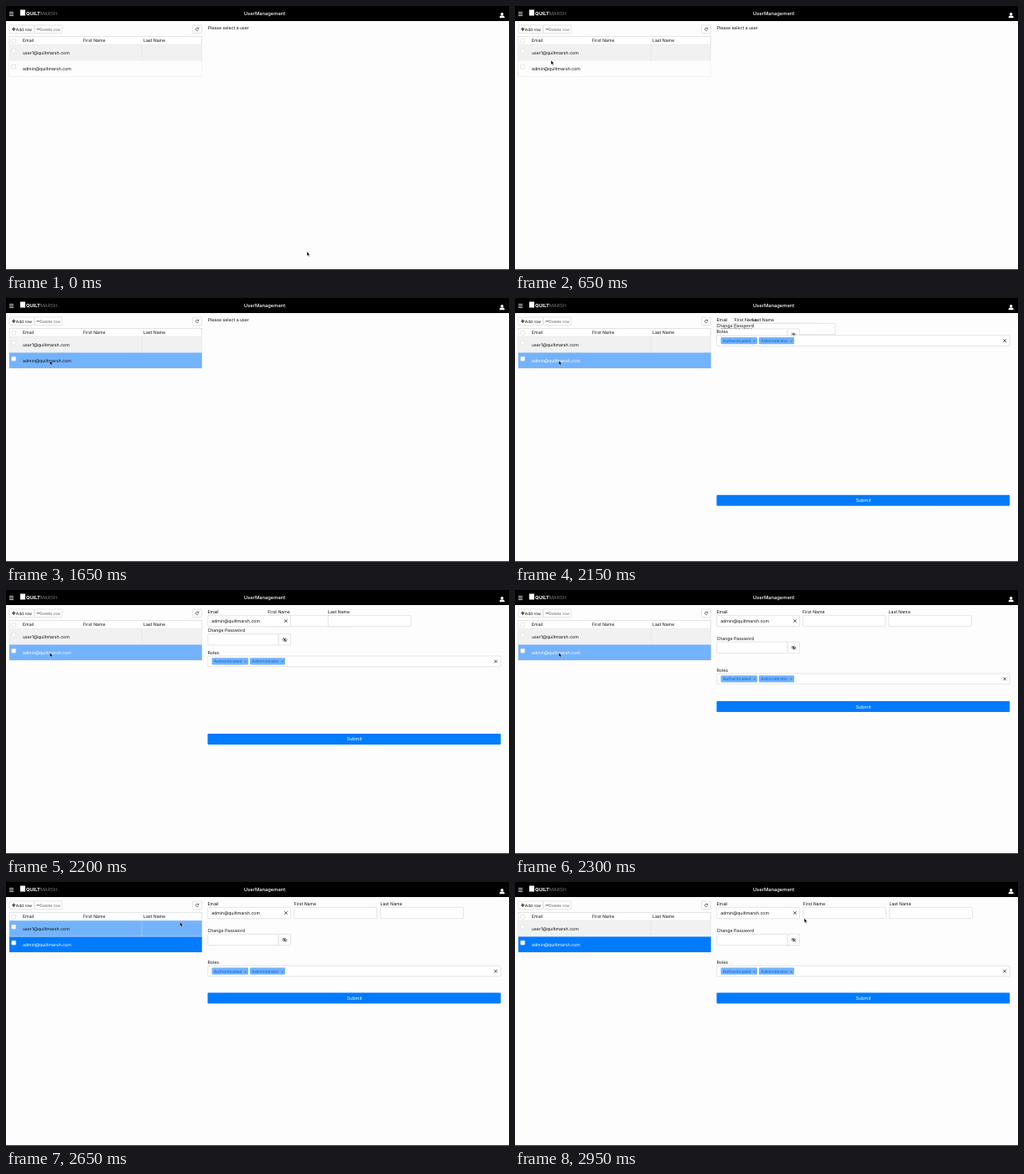
These frames come from a looping animation (600x316 px, 3000 ms). An HTML page:

```html
<!DOCTYPE html>
<html lang="en">
<head>
<meta charset="utf-8">
<title>UserManagement</title>
<style>
  html, body { margin: 0; width: 100%; height: 100%; overflow: hidden; background: #fdfdfd; }
  svg { display: block; width: 100vw; height: 100vh; }
  text { font: 5.2px Inter, sans-serif; fill: #111; text-rendering: geometricPrecision; }
  .small { font-size: 4.85px; }
  .muted { fill: #666; }
  .white { fill: #fff; }
  .tag text { font-size: 5.1px; fill: #0d62d0; }
  .tag rect { fill: #73b3fd; }
  .box { fill: #fff; stroke: #d4d4d4; stroke-width: .6; }
  .line { fill: none; stroke: #222; stroke-width: .8; }
</style>
</head>
<body>
<svg viewBox="0 0 600 316">
  <rect width="600" height="316" fill="#fdfdfd"/>
  <rect y="315" width="600" height="1" fill="#333"/>

  <rect width="600" height="18" fill="#000"/>
  <path class="line" d="M4 7.5h5M4 9.5h5M4 11.5h5" style="stroke:#fff"/>
  <rect class="white" x="17" y="4.5" width="6" height="7"/>
  <text x="24" y="10.5" class="white" style="font-size:5.7px;font-weight:700">QUILT<tspan fill="#999" font-weight="300">MARSH</tspan></text>
  <text x="308.5" y="11" class="white" text-anchor="middle" style="font-size:5.8px;font-weight:500">UserManagement</text>
  <g class="white"><circle cx="591.7" cy="9.7" r="1.7"/><path d="M588.8 14.2v-1q0-1.7 1.8-1.7h2.2q1.8 0 1.8 1.7v1z"/></g>

  <g id="table">
    <rect class="box" x="4" y="23" width="29.5" height="9.5" rx="1"/>
    <path class="line" d="M7 27.8h4.4M9.2 25.6v4.4" style="stroke-width:1.1"/>
    <text class="small" x="11.8" y="29.5">Add row</text>
    <rect class="box" x="34" y="23" width="33" height="9.5" rx="1"/>
    <path class="line" d="M36.5 27.8h4" style="stroke:#666;stroke-width:1.1"/>
    <text class="small muted" x="40.4" y="29.5">Delete row</text>
    <rect class="box" x="222.5" y="23" width="11" height="9.5" rx="1"/>
    <path class="line" d="M229.5 26.8a1.7 1.7 0 1 0 .2 1.8M229.8 25.8v1.5h-1.5" style="stroke-width:.6"/>
    <rect class="box" x="4" y="36.5" width="229.7" height="47.5"/>
    <text x="20" y="43.2">Email</text>
    <text x="92" y="43.2">First Name</text>
    <text x="164" y="43.2">Last Name</text>
    <rect id="row1" x="4" y="46" width="229.7" height="19"/>
    <rect id="row2" x="4" y="65.3" width="229.7" height="18.7"/>
    <path d="M4 46.2h229.7M4 65.2h229.7M162 46.2v19" fill="none" stroke="#ddd" stroke-width=".4"/>
    <text x="20" y="57.8">user1@quiltmarsh.com</text>
    <text id="row2Text" x="20" y="76.6">admin@quiltmarsh.com</text>
    <rect class="box" x="6.7" y="39.2" width="5" height="5" rx="1"/>
    <rect class="box" x="6.7" y="51.2" width="5" height="5" rx="1"/>
    <rect class="box" x="6.7" y="70.2" width="5" height="5" rx="1"/>
  </g>

  <text id="prompt" x="240.7" y="28">Please select a user</text>

  <g id="form">
    <g id="first"><text y="28">First Name</text><rect class="box" x=".3" y="30.3" width="98.7" height="13.4" rx="1"/></g>
    <g transform="translate(240.5)">
      <text y="28">Email</text>
      <rect class="box" x=".3" y="30.3" width="98.7" height="13.4" rx="1"/>
      <text x="4.7" y="39">admin@quiltmarsh.com</text>
      <path class="line" d="M91.5 35.2l3.6 3.6m0-3.6l-3.6 3.6"/>
    </g>
    <g id="last"><text y="28">Last Name</text><rect class="box" x=".3" y="30.3" width="98.7" height="13.4" rx="1"/></g>
    <g id="password">
      <text y="28">Change Password</text>
      <rect class="box" x=".3" y="30.3" width="84.4" height="13.4" rx="1"/>
      <rect class="box" x="84.7" y="30.3" width="14.3" height="13.4" rx="1"/>
      <path class="line" d="M89.3 37.3q2.7-3.6 5.4 0q-2.7 3.6-5.4 0M89.6 34.9l4.8 4.8" style="stroke-width:.6"/>
      <circle cx="92" cy="37.3" r=".9"/>
    </g>
    <g id="roles">
      <text y="28">Roles</text>
      <rect class="box" x=".3" y="30.3" width="349.2" height="12.7" rx="1"/>
      <g class="tag">
        <rect x="5" y="32.5" width="43.5" height="8.2" rx="1"/>
        <text x="7.3" y="38.5">Authenticated</text><text x="43.4" y="38.5">×</text>
        <rect x="50.5" y="32.5" width="42" height="8.2" rx="1"/>
        <text x="52.7" y="38.5">Administrator</text><text x="87.4" y="38.5">×</text>
      </g>
      <path class="line" d="M341.8 34.9l3.6 3.6m0-3.6l-3.6 3.6"/>
    </g>
    <g id="submit">
      <rect x="0" y="-6.5" width="349.7" height="13" rx="1.2" fill="#007bff"/>
      <text class="white" x="175" y="1.9" text-anchor="middle" style="font-size:5.5px">Submit</text>
    </g>
  </g>

  <path id="cursor" d="M0 0V5.1L1.2 4.1L2 6L2.9 5.6L2.1 3.8H3.6Z" fill="#000" stroke="#fff" stroke-width=".35"/>
</svg>
<script>
const LOOP = 3000, STEP = 50, HOVER_FROM = 1200, SELECT_AT = 2150;
const LAYOUT_START = 2118, LAYOUT_TIME = 200;
const $ = id => document.getElementById(id);

// Pointer path: time, x, y
const path = [
  [0, 359, 294], [50, 359, 294], [250, 100, 106], [400, 100, 106],
  [650, 43, 65], [700, 43, 65], [900, 49, 77], [1150, 49, 77],
  [1650, 52.3, 75], [2350, 52.3, 75], [2450, 70, 71], [2550, 122, 60],
  [2650, 207.5, 48], [2700, 300, 76], [2750, 372, 118], [2800, 406, 132],
  [2850, 396, 105], [2900, 362, 60], [2950, 345, 43.5], [LOOP, 345, 43.5]
];

function pointerAt(t) {
  const i = path.findIndex(key => key[0] > t);
  const [t0, x0, y0] = path[i - 1], [t1, x1, y1] = path[i];
  const k = (t - t0) / (t1 - t0);
  return [x0 + (x1 - x0) * k, y0 + (y1 - y0) * k];
}

// CSS "ease": cubic-bezier(.25, .1, .25, 1)
function ease(x) {
  if (x <= 0) return 0;
  if (x >= 1) return 1;
  const bezier = (s, a, b) => 3 * s * (1 - s) ** 2 * a + 3 * s * s * (1 - s) * b + s ** 3;
  let low = 0, high = 1;
  for (let i = 0; i < 24; i++) {
    const mid = (low + high) / 2;
    if (bezier(mid, .25, .25) < x) low = mid; else high = mid;
  }
  return bezier(low, .1, 1);
}

const move = (id, x, y) => $(id).setAttribute('transform', `translate(${x} ${y})`);
const show = (id, on) => $(id).setAttribute('visibility', on ? 'visible' : 'hidden');
const fill = (id, color) => { $(id).style.fill = color; };

function draw(t) {
  const [x, y] = pointerAt(t);
  const selected = t >= SELECT_AT;
  const hovered = (top, bottom) => t >= HOVER_FROM && x > 4 && x < 234 && y >= top && y < bottom;
  move('cursor', x, y);
  fill('row1', hovered(46, 65) ? '#73b3fd' : '#f1f1f1');
  fill('row2', hovered(65, 84) ? '#73b3fd' : selected ? '#007bff' : '#fdfdfd');
  fill('row2Text', selected ? '#fff' : '#111');
  show('prompt', !selected);
  show('form', selected);

  // Fields spread out from the top left corner while the button rises.
  const p = ease((t - LAYOUT_START) / LAYOUT_TIME), left = 240.5;
  move('first', left + 103 * p, 0);
  move('last', left + 206 * p, 0);
  move('password', left, 32 * p);
  move('roles', left, 70 * p);
  move('submit', left, 269 - 130 * p);
}

function tick() {
  const t = performance.now() % LOOP;
  draw(Math.floor(t / STEP) * STEP);
  requestAnimationFrame(tick);
}
tick();
</script>
</body>
</html>
```
